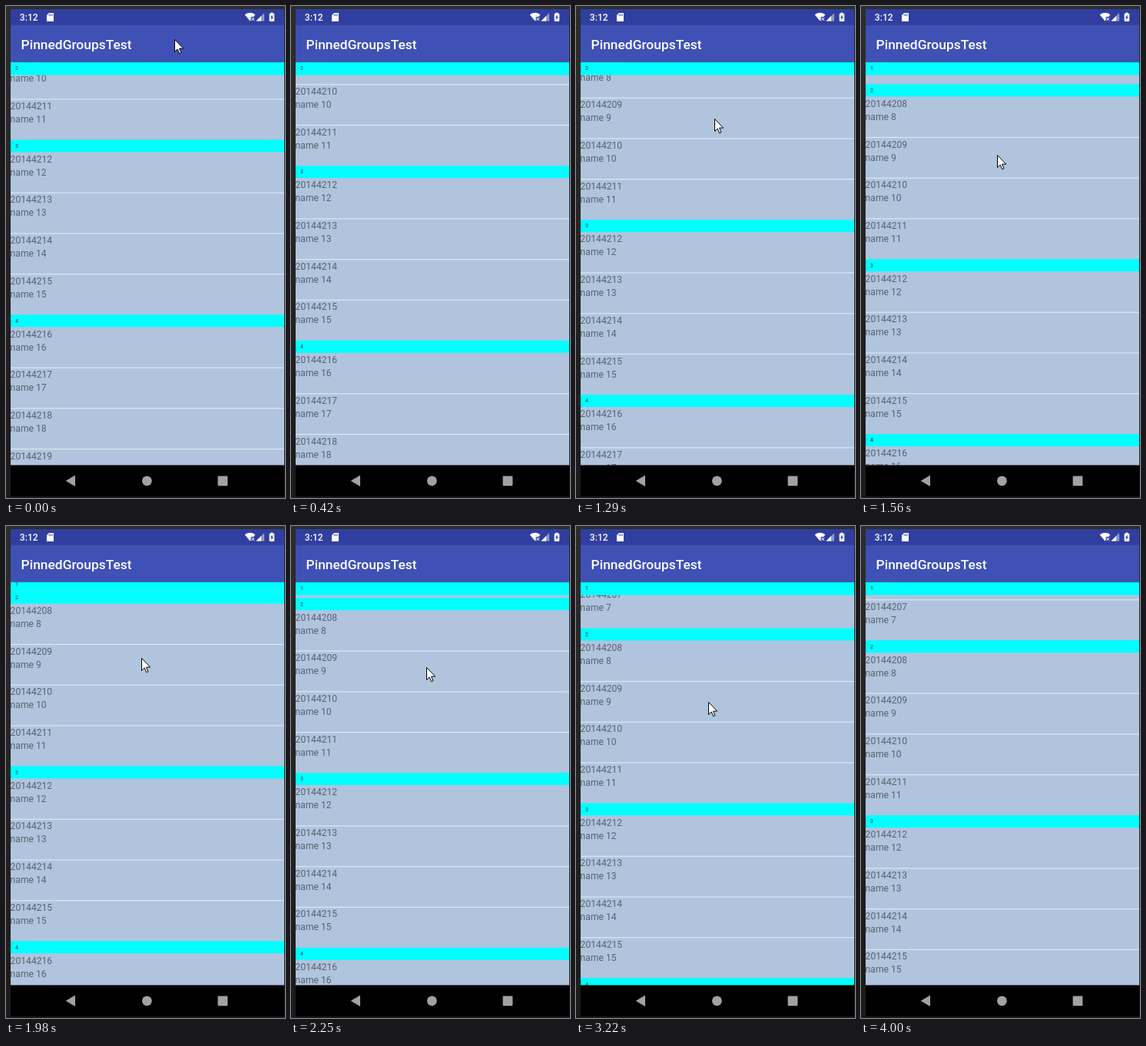
Write an HTML page with a canvas that moves like this. It is 363x638 px and loops after 4.25 s.

```html
<!DOCTYPE html>
<html lang="en">
<head>
<meta charset="utf-8">
<title>Pinned group list</title>
<style>
html, body { margin: 0; width: 100%; height: 100%; overflow: hidden; background: #222; }
canvas { display: block; }
</style>
</head>
<body>
<canvas id="stage" width="363" height="638"></canvas>
<script>
const canvas = document.getElementById('stage');
const c = canvas.getContext('2d');
const LOOP = 4250;
const LEFT = 6, WIDTH = 356, TOP = 72.6, BOTTOM = 595.4;
const ROW = 52.7, HEAD = 16, GROUP = HEAD + 4 * ROW, PINNED = 17;
const BAR = '#303f9f', CYAN = '#00ffff', INK = '#59626e', GREY = '#a2a2a2';

// turning points: time, top of group 3, pointer x, pointer y
const path = [
  [0, 173.4, 218.5, 43],
  [420, 207, 236, -40],
  [780, 208, 202, 35],
  [1050, 255.8, 181, 127],
  [1560, 328.3, 177, 193],
  [1980, 311.4, 176, 171],
  [2250, 320, 176, 183],
  [2680, 317.3, 176, 182],
  [3220, 359.4, 172, 228],
  [3490, 375, 225, 300],
  [4000, 375, 360, 650]
];

// The picture refreshes in alternating holds, restarting at each run.
const runs = [0, 150, 780, 1560, 2530, 4000];
const LONG = 150, SHORT = 120;

function snap(time) {
  const start = runs.findLast(t => t <= time);
  const phase = (time - start) % (LONG + SHORT);
  return time - phase + (phase >= LONG ? LONG : 0);
}

function poseAt(time) {
  const i = Math.min(path.findLastIndex(p => p[0] <= time), path.length - 2);
  const from = path[i], to = path[i + 1];
  const k = Math.min(1, (time - from[0]) / (to[0] - from[0]));
  const [, list, x, y] = from.map((v, j) => v + (to[j] - v) * k);
  const fling = Math.round(208 - 34.6 * Math.exp(-time / 120));
  return { list: time > 0 && time < 780 ? fling : list, x, y };
}

function rect(x, y, w, h, color) {
  c.fillStyle = color;
  c.fillRect(x, y, w, h);
}

function label(text, x, y, size, color, weight = 400) {
  c.font = `${weight} ${size}px Roboto, sans-serif`;
  c.fillStyle = color;
  c.fillText(text, x, y);
}

function shape(points, color) {
  c.beginPath();
  points.forEach(([x, y]) => c.lineTo(x, y));
  c.closePath();
  c.fillStyle = color;
  c.fill();
}

function round(x, y, w, h, r, color) {
  c.beginPath();
  c.roundRect(x, y, w, h, r);
  c.fillStyle = color;
  c.fill();
}

function header(group, y, height) {
  rect(LEFT, y, WIDTH, height, CYAN);
  label(group, 12, y + 10.3, 6.8, '#0c3a3e');
}

function drawList(base) {
  const topOf = g => base + (g - 3) * GROUP;
  let pinned = 1;
  c.save();
  c.beginPath();
  c.rect(LEFT, TOP, WIDTH, 638 - TOP);
  c.clip();
  rect(LEFT, TOP, WIDTH, 638 - TOP, '#b0c4de');
  for (let g = 1; g <= 5; g++) {
    const y = topOf(g);
    if (y <= TOP) pinned = g;
    for (let i = 0; i < 4; i++) {
      const n = g * 4 + i, top = y + HEAD + i * ROW;
      if (i) rect(LEFT, top - 0.3, WIDTH, 1.1, '#e3eaf4');
      label(20144200 + n, 5.6, top + 13.3, 12.15, INK);
      label('name ' + n, 5.6, top + 30.3, 12.15, INK);
    }
    header(g, y, HEAD);
  }
  header(pinned, Math.min(TOP, topOf(pinned + 1) - PINNED), PINNED);
  c.restore();
}

function drawStatus() {
  label('3:12', 17.8, 19, 12.1, '#fff', 500);
  shape([[56, 9], [62, 9], [62, 20], [53, 20], [53, 12]], '#fff');
  for (let i = 0; i < 3; i++) rect(55.7 + i * 2, 10.5, 1, 2.3, BAR);

  c.beginPath();
  c.moveTo(317.5, 19.5);
  c.lineTo(310.6, 11.3);
  c.quadraticCurveTo(317.5, 6.4, 324.4, 11.3);
  c.closePath();
  c.fillStyle = '#fff';
  c.fill();
  rect(318.6, 14, 5.4, 6, BAR);
  c.beginPath();
  c.moveTo(319.5, 15);
  c.lineTo(323, 19);
  c.moveTo(323, 15);
  c.lineTo(319.5, 19);
  c.strokeStyle = '#fff';
  c.lineWidth = 1;
  c.stroke();

  shape([[336, 9], [336, 19.5], [325.5, 19.5]], '#8f98cc');
  shape([[332, 13], [332, 19.5], [325.5, 19.5]], '#fff');

  rect(344.3, 8.6, 3, 2, '#fff');
  round(342.6, 9.7, 6.6, 10.2, 0.8, '#fff');
  shape([[346.6, 11], [344, 15.3], [345.5, 15.3], [345.2, 18.4], [347.8, 14.1], [346.3, 14.1]], BAR);
}

function drawNav() {
  rect(LEFT, BOTTOM, WIDTH, 636 - BOTTOM, '#000');
  shape([[77.8, 615.8], [90, 608.6], [90, 623]], GREY);
  round(177, 609.4, 12.8, 12.8, 6.4, GREY);
  round(275.6, 609.4, 12.8, 12.8, 1.2, GREY);
}

function drawPointer(x, y) {
  c.save();
  c.translate(Math.round(x) + 0.5, Math.round(y) + 0.5);
  shape([[0, 0], [0, 16], [3.7, 12.5], [6.2, 18.2], [8.5, 17.2], [6, 11.6], [11.2, 11.6]], '#fff');
  c.strokeStyle = '#000';
  c.lineWidth = 1;
  c.stroke();
  c.restore();
}

function draw(time) {
  const pose = poseAt(snap(time));
  const edge = c.createLinearGradient(0, 0, 0, 638);
  edge.addColorStop(0, '#2d2d2d');
  edge.addColorStop(1, '#1b1b1b');
  rect(0, 0, 363, 638, edge);
  drawList(pose.list);
  drawNav();
  rect(LEFT, 636, WIDTH, 2, edge);
  rect(LEFT, 4, WIDTH, 20.5, BAR);
  rect(LEFT, 24.5, WIDTH, TOP - 24.5, '#3f51b5');
  drawStatus();
  label('PinnedGroupsTest', 19.6, 55.6, 17.4, '#fff', 500);
  drawPointer(pose.x, pose.y);
}

function tick() {
  draw(performance.now() % LOOP);
  requestAnimationFrame(tick);
}
tick();
</script>
</body>
</html>
```
